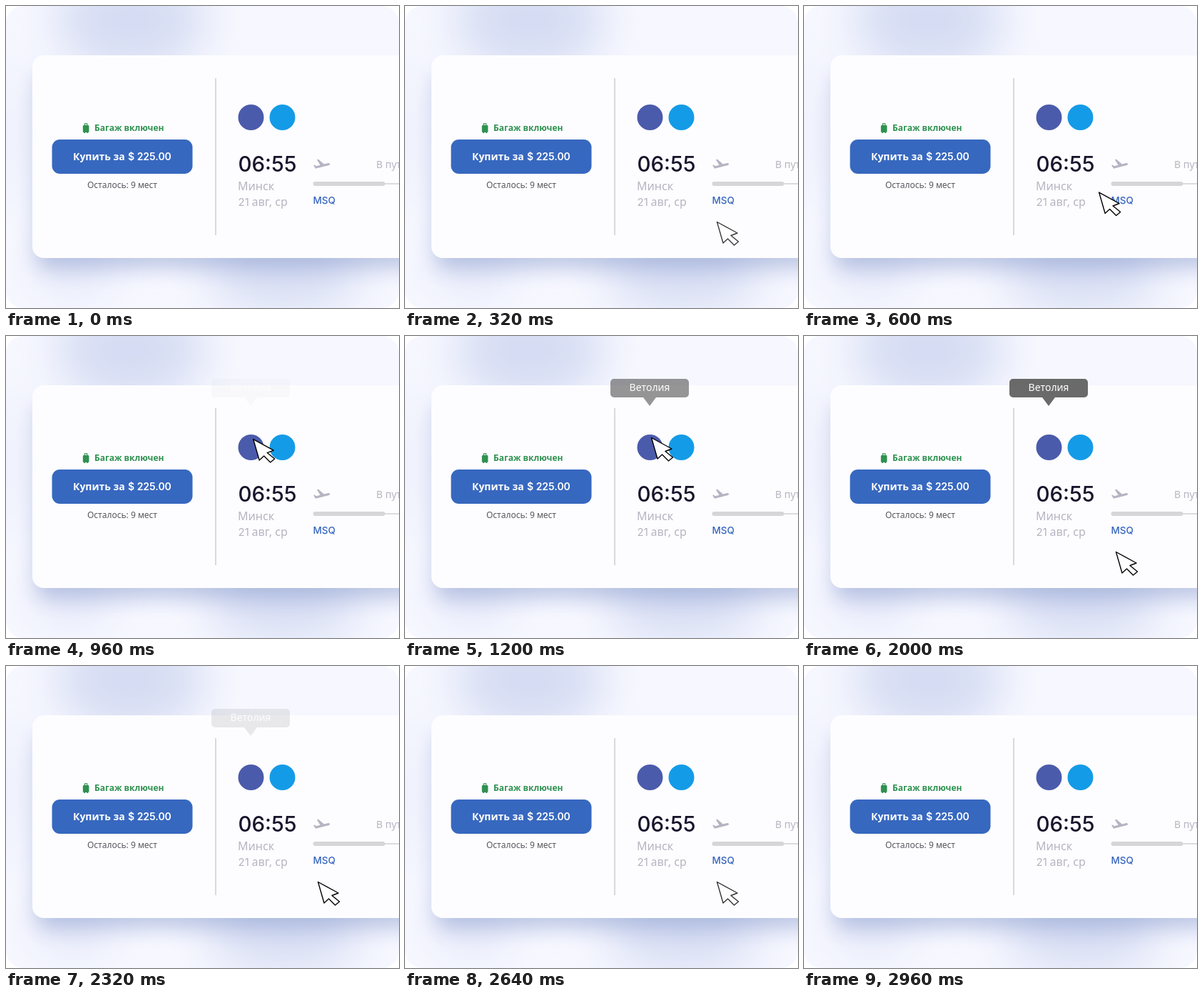
Animation of 551x423 px, one loop 3060 ms. Source, as an HTML page:

```html
<!DOCTYPE html>
<html lang="ru">
<head>
<meta charset="utf-8">
<title>Билет</title>
<style>
  html, body { margin: 0; width: 100%; height: 100%; overflow: hidden; background: #fff; }
  svg { display: block; width: 551px; height: 423px; }
  text { font-family: "Noto Sans", "Open Sans", sans-serif; }
  .latin { font-family: Inter, Roboto, sans-serif; }
  .muted { fill: #b6b4c2; }
</style>
</head>
<body>
<svg viewBox="0 0 551 423" xmlns="http://www.w3.org/2000/svg">
  <defs>
    <clipPath id="stage"><rect width="551" height="423" rx="24"/></clipPath>
    <filter id="soft" x="-60%" y="-60%" width="220%" height="220%"><feGaussianBlur stdDeviation="32"/></filter>
    <filter id="shadow" x="-20%" y="-20%" width="140%" height="150%"><feGaussianBlur stdDeviation="14"/></filter>
  </defs>

  <g clip-path="url(#stage)">
    <rect width="551" height="423" fill="#f7f8ff"/>
    <g filter="url(#soft)" fill="#d5dcf3">
      <ellipse cx="175" cy="20" rx="105" ry="75"/>
      <ellipse cx="390" cy="375" rx="110" ry="50"/>
      <ellipse cx="95" cy="365" rx="60" ry="38" opacity=".6"/>
      <ellipse cx="10" cy="180" rx="25" ry="110" opacity=".35"/>
    </g>
    <rect x="42" y="96" width="560" height="272" rx="16" fill="#4a66b0" opacity=".32" filter="url(#shadow)"/>
    <rect x="37" y="69" width="560" height="284" rx="16" fill="#fdfdff"/>

    <!-- purchase -->
    <g fill="#2f9150">
      <rect x="107.8" y="167" width="8.6" height="10" rx="1.4"/>
      <path d="M109 176h1.8v2h-1.8zM113.4 176h1.8v2h-1.8z"/>
      <path d="M110.4 167.5v-2.6h3.4v2.6" fill="none" stroke="#2f9150" stroke-width="1.1"/>
      <text x="124" y="175" font-size="12" font-weight="700">Багаж включен</text>
    </g>
    <rect x="64.5" y="187" width="197" height="48" rx="11" fill="#3768bf"/>
    <g fill="#fff" font-size="14">
      <text x="94" y="216" font-weight="700">Купить за</text>
      <text x="171" y="216" class="latin" font-weight="600">$ 225.00</text>
    </g>
    <text x="163" y="255" font-size="12" text-anchor="middle" fill="#58565f">Осталось: 9 мест</text>

    <path d="M294 101V321" stroke="#d5d5d9" stroke-width="1.8"/>

    <!-- flight -->
    <circle cx="343.5" cy="156" r="18" fill="#4b5bab"/>
    <circle cx="387.5" cy="156" r="18" fill="#149be7"/>
    <text x="325.5" y="231.5" class="latin" font-size="29.5" font-weight="500" fill="#17142b">06:55</text>
    <g class="muted" font-size="16">
      <text x="325" y="258">Минск</text>
      <text x="325.5" y="280" class="latin" font-size="15">21</text>
      <text x="344.5" y="280">авг, ср</text>
      <text x="519" y="227" font-size="14">В пути</text>
      <path transform="translate(429 211) scale(1.13 1.05)" d="M22.07 9.64c-.21-.8-1.04-1.28-1.84-1.06L14.92 10l-6.9-6.43-1.93.51 4.14 7.17-4.97 1.33-1.97-1.54-1.45.39 2.59 4.49L21 11.49c.81-.23 1.28-1.05 1.07-1.85z"/>
    </g>
    <path d="M431 249H551" stroke="#dcdce0" stroke-width="1.8"/>
    <rect x="430.5" y="246" width="101" height="6" rx="3" fill="#d6d6d9"/>
    <text x="430.5" y="277" class="latin" font-size="13.5" font-weight="500" fill="#3564bd">MSQ</text>

    <g id="tooltip">
      <path d="M293 60H393a5 5 0 0 1 5 5V81a5 5 0 0 1-5 5H352L343 98L334 86H293a5 5 0 0 1-5-5V65a5 5 0 0 1 5-5z" fill="#575757"/>
      <text x="343" y="77" font-size="14" text-anchor="middle" fill="#fff">Ветолия</text>
    </g>
    <path id="cursor" d="M.5 .5L29 16L20 19.5L30.5 28L24.5 33L15.5 24L9 30z" fill="#fff" stroke="#000" stroke-width="1.4" stroke-linejoin="round"/>
  </g>
</svg>
<script>
  const LOOP = 3060;
  const REST = { x: 437, y: 302 };
  const HOVER = { x: 345, y: 142 };
  const tooltip = document.getElementById("tooltip");
  const cursor = document.getElementById("cursor");

  const ramp = (t, from, to) => Math.min(1, Math.max(0, (t - from) / (to - from)));
  const ease = p => p * p * (3 - 2 * p);
  const mix = (a, b, p) => a + (b - a) * p;

  function draw(t) {
    const reach = ease(ramp(t, 400, 1000)) - ease(ramp(t, 1420, 2000));
    const x = mix(REST.x, HOVER.x, reach);
    const y = mix(REST.y, HOVER.y, reach);
    cursor.setAttribute("transform", `translate(${x} ${y})`);
    cursor.setAttribute("opacity", ramp(t, 40, 400) - ramp(t, 2560, 2960));
    tooltip.setAttribute("opacity", ramp(t, 950, 1350) - ramp(t, 1950, 2370));
  }

  const start = performance.now();
  function tick() {
    const elapsed = (performance.now() - start) % LOOP;
    draw(Math.floor(elapsed / 40) * 40);
    requestAnimationFrame(tick);
  }
  draw(0);
  requestAnimationFrame(tick);
</script>
</body>
</html>
```
